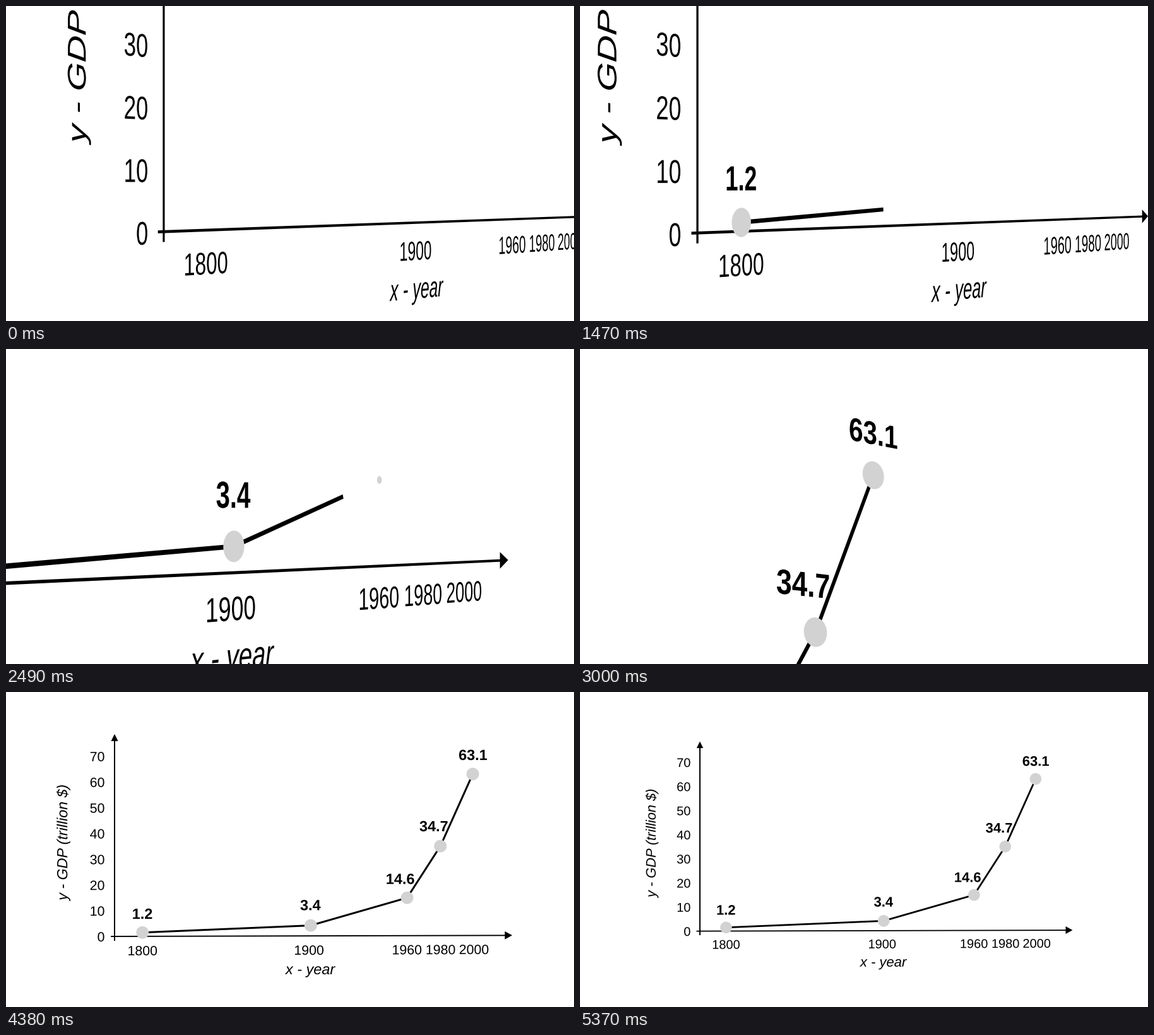
Write a matplotlib script that moves like this. It is 900 px wide and 500 px high and loops after 8.1 s.

```python
import numpy as np
import matplotlib.pyplot as plt
from matplotlib.animation import FuncAnimation
from matplotlib.patches import PathPatch
from matplotlib.path import Path
from matplotlib.textpath import TextPath

W, H, STEP, LOOP = 900, 500, 30, 8100
GREY = "#d2d2d2"

# Camera poses: time, then centre x, y on the chart, scale x, y,
# slant x, y and perspective falloff along x, y.
POSES = np.array([
    [0, 321.0, 336.0, 1.395, 2.336, 0, .0228, .000661, 0],
    [960, 335.8, 335.6, 1.379, 2.311, 0, .0210, .000661, 0],
    [1950, 405.1, 335.0, 1.362, 2.273, 0, .0208, .000649, 0],
    [2490, 532.9, 339.7, 1.654, 2.590, 0, .0060, .000746, 0],
    [3000, 713.8, 160.0, 1.847, 2.383, 0, .2900, .000650, -.00015],
    [3870, 713.8, 160.0, 1.847, 2.383, 0, .2900, .000650, -.00015],
    [4380, 450.5, 250.3, 1.067, 1.067, 0, 0, 0, 0],
    [5370, 450.0, 250.0, 1.000, 1.000, 0, 0, 0, 0],
])
TIMES, VALUES = POSES[:, 0], POSES[:, 1:]


def monotone_slopes(t, v):
    sec = np.diff(v, axis=0) / np.diff(t)[:, None]
    a, b = sec[:-1], sec[1:]
    same = a * b > 0
    slopes = np.zeros_like(v)
    slopes[1:-1] = np.where(same, 2 * a * b / np.where(same, a + b, 1), 0)
    return slopes


SLOPES = monotone_slopes(TIMES, VALUES)


def camera(t):
    if t >= TIMES[-1]:
        return VALUES[-1]
    i = np.searchsorted(TIMES, t, side="right") - 1
    d = TIMES[i + 1] - TIMES[i]
    s = (t - TIMES[i]) / d
    rise = s * s * (3 - 2 * s)
    return (VALUES[i] * (1 - rise) + VALUES[i + 1] * rise
            + d * (SLOPES[i] * s * (1 - s) ** 2 + SLOPES[i + 1] * s * s * (s - 1)))


def project(points, pose):
    cx, cy, sx, sy, kx, ky, g, h = pose
    u, v = points[:, 0] - cx, points[:, 1] - cy
    w = 1 + g * u + h * v
    return np.column_stack([W / 2 + (sx * u + kx * v) / w,
                            H / 2 + (ky * u + sy * v) / w])


def ramp(t, start, length):
    return min(max((t - start) / length, 0), 1)


def smooth(s):
    return s * s * (3 - 2 * s)


def polygon(points):
    pts = list(points)
    return Path(np.array(pts + pts[:1], float), closed=True)


def stroke(p, q, width):
    p, q = np.array(p, float), np.array(q, float)
    d = q - p
    n = np.array([-d[1], d[0]]) / max(np.hypot(*d), 1e-9) * width / 2
    return polygon([p + n, q + n, q - n, p - n])


def disc(center, radius):
    c = Path.unit_circle()
    return Path(c.vertices * radius + center, c.codes)


def lettering(text, x, y, size, weight="normal", style="normal",
              turned=False, align="center"):
    font = {"family": "Liberation Sans", "weight": weight, "style": style}
    tp = TextPath((0, 0), text, size=size, prop=font)
    v = tp.vertices * [1, -1]
    if turned:
        v = np.column_stack([v[:, 1], -v[:, 0]])
    box = Path(v, tp.codes).get_extents()
    ax_x = box.x1 if align == "right" else (box.x0 + box.x1) / 2
    return Path(v + [x - ax_x, y - (box.y0 + box.y1) / 2], tp.codes)


def scaled(path, center, k):
    c = np.array(center)
    return Path(c + (path.vertices - c) * k, path.codes)


DOTS = [(231.4, 373.8), (481.2, 363.3), (624.4, 322.1), (673.8, 245.3), (721.9, 138)]
LABELS = [("1.2", 231.5, 345.8), ("3.4", 481, 333), ("14.6", 614.5, 294),
          ("34.7", 663.8, 215.6), ("63.1", 722.3, 109.6)]
YEARS = [("1800", 231.8, 400.8), ("1900", 479.1, 400), ("1960", 624.5, 399.4),
         ("1980", 674.5, 399.2), ("2000", 723.8, 399)]
DOT_START = [210, 1799, 2428, 2620, 2770]
LABEL_START = [380, 2010, 2620, 2760, 2850]
LINES = [(597, 1429), (2030, 630), (2660, 140), (2800, 140)]

fig = plt.figure(figsize=(W / 100, H / 100), dpi=100, facecolor="white")
ax = fig.add_axes([0, 0, 1, 1])
ax.set_xlim(0, W)
ax.set_ylim(H, 0)
ax.axis("off")


def add(color="black"):
    patch = PathPatch(Path([(0, 0), (0, 0)]), facecolor=color, linewidth=0)
    return ax.add_patch(patch)


fixed = [
    stroke((190, 386), (190, 86), 1.9),
    polygon([(190, 78.5), (195.2, 89), (184.8, 89)]),
    stroke((184.5, 379.6), (771, 378.1), 1.8),
    polygon([(780.5, 378), (769.5, 372), (769.5, 384)]),
    lettering("y - GDP (trillion $)", 114, 241, 21.8, style="italic", turned=True),
    lettering("x - year", 480.5, 432.2, 22, style="italic"),
]
fixed += [lettering(str(10 * k), 174.6, 380.2 - 38.3 * k, 20, align="right")
          for k in range(8)]
fixed += [lettering(*year, 20) for year in YEARS]
words = [lettering(*label, 22, weight="bold") for label in LABELS]

fixed_art = [add() for _ in fixed]
line_art = [add() for _ in LINES]
dot_art = [add(GREY) for _ in DOTS]
word_art = [add() for _ in words]


def place(patch, path, pose):
    patch.set_path(Path(project(path.vertices, pose), path.codes))


def draw(frame):
    t = frame * STEP
    pose = camera(t)
    for patch, path in zip(fixed_art, fixed):
        place(patch, path, pose)
    for i, (patch, (start, length)) in enumerate(zip(line_art, LINES)):
        k = ramp(t, start, length)
        patch.set_visible(k > 0)
        p, q = np.array(DOTS[i]), np.array(DOTS[i + 1])
        place(patch, stroke(p, p + (q - p) * k, 2.8), pose)
    for patch, center, start in zip(dot_art, DOTS, DOT_START):
        k = smooth(ramp(t, start, 180))
        patch.set_visible(k > 0)
        place(patch, disc(center, 9.3 * k), pose)
    for patch, path, label, start in zip(word_art, words, LABELS, LABEL_START):
        k = smooth(ramp(t, start, 120))
        patch.set_visible(k > 0)
        place(patch, scaled(path, label[1:], k), pose)
    return fixed_art + line_art + dot_art + word_art


anim = FuncAnimation(fig, draw, frames=LOOP // STEP, init_func=lambda: draw(0),
                     interval=STEP, repeat=True, repeat_delay=0, blit=False)
plt.show()
```
